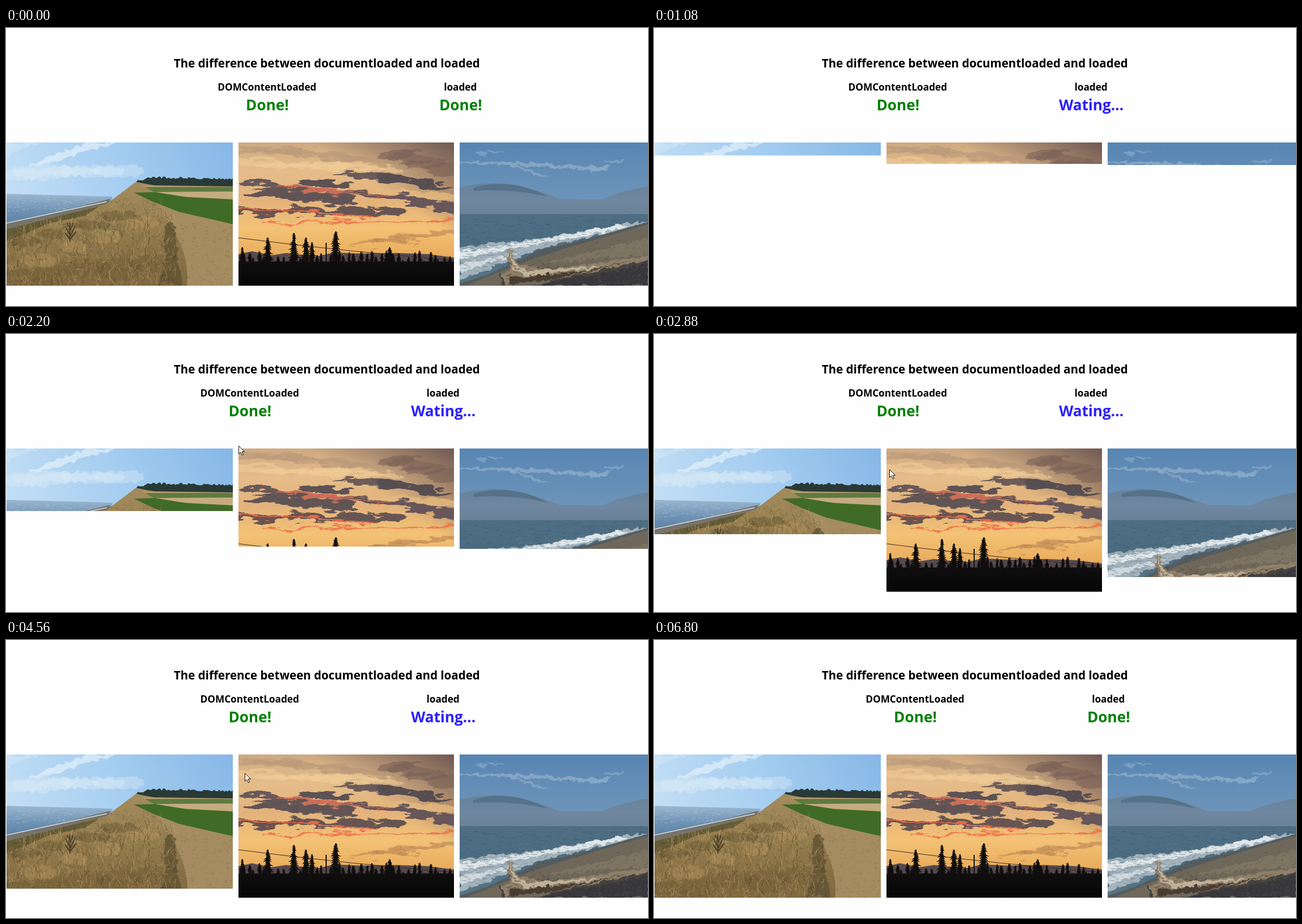
Recreate the animation shown at these times as an HTML page. Size 1135 px wide and 493 px high, loop 6.95 s.

```html
<!DOCTYPE html>
<html lang="en">
<head>
<meta charset="utf-8">
<title>Load events</title>
<style>
html, body { margin: 0; width: 100%; height: 100%; overflow: hidden; background: #fefefe; }
svg { display: block; width: 1135px; height: 493px; }
text { font-family: "Open Sans", "Noto Sans", sans-serif; font-weight: 700; text-anchor: middle; }
.head { font-size: 17.2px; }
.state { font-size: 26.2px; fill: #008000; }
</style>
</head>
<body>
<svg id="stage" viewBox="0 0 1135 493" xmlns="http://www.w3.org/2000/svg"></svg>
<script>
const TOP = 203, BOTTOM = 457;
const get = id => document.getElementById(id);

let seed = 11;
function rnd() {
  seed = (seed * 1664525 + 1013904223) >>> 0;
  return seed / 4294967296;
}
const between = (a, b) => a + (b - a) * rnd();
const mix = (a, b, u) => a + (b - a) * u;
const fix = n => n.toFixed(1);

const shape = (d, fill, o = 1) => `<path d="${d}" fill="${fill}" opacity="${o}"/>`;
const line = (d, color, w, o = 1) =>
  `<path d="${d}" fill="none" stroke="${color}" stroke-width="${w}" opacity="${o}"/>`;
const box = (x, y, w, fill) => `<rect x="${x}" y="${y}" width="${w}" height="${BOTTOM - y}" fill="${fill}"/>`;
const fray = (...parts) => `<g filter="url(#fray)">${parts.join('')}</g>`;

// Evenly spaced colour stops
function gradient(id, colors, dir = 'x1="0" y1="0" x2="0" y2="1"') {
  const stops = colors.map((c, i) => `<stop offset="${i / (colors.length - 1)}" stop-color="${c}"/>`);
  return `<linearGradient id="${id}" ${dir}>${stops.join('')}</linearGradient>`;
}

function rough(id, freq, scale) {
  return `<filter id="${id}" x="-10%" y="-10%" width="120%" height="120%" color-interpolation-filters="sRGB">
    <feTurbulence type="fractalNoise" baseFrequency="${freq}" numOctaves="4" seed="4"/>
    <feDisplacementMap in="SourceGraphic" scale="${scale}" xChannelSelector="R" yChannelSelector="G"/></filter>`;
}

// Short strokes scattered over a rectangle
function scatter(n, x0, x1, y0, y1, dx, dy, color, o = 0.5) {
  let d = '';
  for (let i = 0; i < n; i++) {
    const sx = between(-dx, dx), sy = between(-dy, 0);
    d += `M${fix(between(x0, x1))} ${fix(between(y0, y1))}q${fix(sx * 0.2)} ${fix(sy * 0.6)} ${fix(sx)} ${fix(sy)}`;
  }
  return line(d, color, 1, o);
}

// Flat ovals strung along a line
function band(n, x0, y0, x1, y1, rx, ry, color, o = 1) {
  let out = '';
  for (let i = 0; i < n; i++) {
    const u = n > 1 ? i / (n - 1) : 0;
    out += `<ellipse cx="${fix(mix(x0, x1, u))}" cy="${fix(mix(y0, y1, u) + between(-ry, ry) * 0.4)}"
      rx="${fix(rx * between(0.8, 1.2))}" ry="${fix(ry * between(0.7, 1.2))}" fill="${color}" opacity="${o}"/>`;
  }
  return out;
}

function conifer(x, top, base) {
  const rows = Math.ceil((base - top) / 4);
  const half = 3 + (base - top) * 0.15;
  let right = '', left = '';
  for (let i = 1; i <= rows; i++) {
    const y = mix(top, base, i / rows), w = half * Math.sqrt(i / rows);
    const a = w * between(0.5, 1.3), b = w * between(0.5, 1.3);
    right += `L${fix(x + a)} ${fix(y)}L${fix(x + a * 0.4)} ${fix(y - 1)}`;
    left = `L${fix(x - b * 0.4)} ${fix(y - 1)}L${fix(x - b)} ${fix(y)}` + left;
  }
  return `M${fix(x)} ${fix(top)}${right}${left}Z`;
}

function treeTops(x0, x1) {
  let d = `M${x0} 273`;
  for (let x = x0; x <= x1; x += 3) d += `L${x} ${fix(Math.max(264 + (x - x0) * 0.02, 272 - (x - x0) * 0.3) + between(-2, 2))}`;
  return d + `L${x1} 281L262 279Z`;
}

const hill = 'M1 357L120 327L178 312L228 274L246 269L270 276L401 281V457H1Z';

function grass() {
  const tones = ['#c0a26a', '#54462a', '#a98b55', '#66562f', '#d0b47c', '#463b24'];
  return tones.map(c => scatter(170, 1, 300, 335, 465, 9, 17, c) + scatter(30, 130, 275, 305, 345, 6, 9, c, 0.4)).join('');
}

const meadow = () => box(1, TOP, 400, 'url(#sky1)') +
  fray(
    shape('M40 247Q95 216 150 203H200Q130 221 62 244Z', '#e3eff9', 0.7),
    shape('M1 226Q35 207 75 204H1Z', '#d3e8f8', 0.5),
    band(5, 20, 262, 200, 255, 50, 12, '#dcebf6', 0.4)
  ) +
  shape('M1 294L188 299V320L1 352Z', 'url(#sea1)') +
  scatter(130, 2, 165, 298, 325, 6, 0.6, '#b4cbdf') +
  shape('M1 346Q90 327 184 303V318L1 360Z', '#77736a') +
  line('M1 346Q90 327 178 308', '#d5dee2', 1.4) +
  shape(hill, 'url(#grass)') +
  shape('M1 357L120 327L165 316L140 333L80 345L1 378Z', '#5b5433', 0.8) +
  shape('M240 279L401 281V303L265 292Z', '#b39c70') +
  shape('M246 282H401V290L262 291Z', '#5f7a3e') +
  shape('M262 291L401 290V304L300 298Z', '#c4ac80') +
  shape('M226 292L264 291L320 300L401 304V348L305 326L262 309Z', '#3f6b27') +
  shape(treeTops(230, 401), '#293a35') +
  `<g clip-path="url(#hillClip)">` +
  shape('M262 309L305 326L401 348V457H320Q326 400 285 340Z', '#a48c60') +
  fray(
    shape('M282 345Q300 340 300 362Q300 390 312 457H268Q288 410 280 385Z', '#5d5032', 0.75),
    band(4, 30, 380, 200, 335, 40, 9, '#6b5d38', 0.5),
    band(5, 20, 440, 260, 420, 40, 16, '#75603a', 0.5),
    band(4, 60, 415, 240, 345, 30, 11, '#b4965f', 0.45)
  ) +
  grass() + scatter(220, 300, 400, 345, 457, 5, 2, '#7a6644') + '</g>' +
  line('M113 379V344M105 352L114 368L123 350M104 363L113 375L124 361M108 346L114 357L119 346', '#3b3421', 1.4);

// A few tall firs stand out of a low, uneven wood
function wood() {
  let d = [[418, 388], [463, 371], [509, 363], [530, 371], [541, 379], [583, 360], [678, 388]]
    .map(([x, y]) => conifer(x, y, 420)).join('');
  for (let x = 414; x < 792; x += 8) d += conifer(x + between(-3, 3), between(394, 415), 420);
  return d;
}

const sunset = () => box(411, TOP, 381, 'url(#sky2)') +
  box(411, TOP, 381, 'url(#dusk)') +
  `<g filter="url(#torn)">` +
  band(6, 440, 215, 640, 235, 45, 6, '#b9987b', 0.6) +
  band(6, 440, 240, 660, 250, 45, 7, '#f0cb96', 0.6) +
  band(4, 690, 225, 770, 250, 40, 9, '#7b6158', 0.6) +
  band(5, 640, 290, 780, 300, 45, 7, '#e3b77d', 0.6) +
  band(8, 480, 280, 680, 300, 30, 4, '#c4705a') +
  band(3, 432, 273, 490, 281, 20, 4, '#66595a') +
  band(3, 545, 274, 600, 277, 24, 6, '#5d5254') +
  band(3, 600, 259, 655, 265, 22, 4, '#6b5c5a') +
  band(4, 680, 268, 765, 280, 24, 6, '#574e52') +
  band(6, 455, 293, 590, 304, 26, 8, '#615455') +
  band(4, 610, 290, 670, 299, 22, 4, '#6a5453') +
  band(8, 418, 326, 680, 326, 28, 7, '#665553') +
  band(4, 700, 302, 785, 320, 28, 8, '#67565a') +
  band(10, 430, 322, 640, 334, 22, 1.8, '#e8694a') +
  band(9, 480, 345, 760, 343, 26, 2, '#ee7a4e') +
  band(6, 500, 281, 670, 297, 20, 1.5, '#dd6a52') +
  band(5, 640, 380, 780, 362, 36, 5, '#b98455', 0.6) +
  '</g>' +
  shape('M411 401L435 396L470 403L495 399L550 405L580 398L625 400L690 399L745 401L792 407V425H411Z', '#55494d') +
  line('M411 372Q550 390 680 402T792 411', '#3b2a25', 1) +
  line('M583 362V418M566 381V418', '#15110f', 2) +
  shape(wood(), '#100e0d') +
  box(411, 414, 381, 'url(#ground)');

const shore = () => box(802, TOP, 333, 'url(#sky3)') +
  fray(
    shape('M802 238Q870 236 930 239L1050 247L1072 243L1060 253L900 244L802 242Z', '#94b1ca', 0.7),
    shape('M890 241Q930 250 960 266L948 266Q920 252 885 244Z', '#8dabc4', 0.7),
    band(2, 840, 223, 865, 218, 14, 2.5, '#86a9c7', 0.7),
    band(2, 1045, 252, 1075, 238, 16, 3, '#8dafcb', 0.6)
  ) +
  shape('M802 283Q860 268 915 282Q950 291 978 303L1055 304Q1080 290 1135 281V335H802Z', 'url(#mist)') +
  shape('M826 284Q862 271 908 280Q940 288 958 299Q890 284 826 289Z', '#526f86', 0.8) +
  box(802, 330, 333, 'url(#sea3)') +
  scatter(220, 804, 1125, 332, 388, 10, 0.7, '#38566b') +
  fray(
    shape('M802 390Q850 381 900 379Q960 370 1010 362L1135 341L1090 358L950 390L840 432L802 447Z', '#a3b2bb'),
    shape('M802 396L930 377L1085 349L1100 353L940 384L802 409Z', '#dfe6e9'),
    shape('M802 420L910 397L880 409L802 434Z', '#d0d9de')
  ) +
  scatter(220, 804, 920, 384, 432, 10, 2, '#667f8e') +
  scatter(120, 900, 1060, 362, 388, 8, 2, '#718896') +
  shape('M1135 344L1010 379L945 394L850 438L802 453V457H1135Z', '#565c5d') +
  shape('M1135 348L985 392L925 412L812 457H1135Z', '#6f685a') +
  fray(
    shape('M1135 372L1000 405L950 418L1135 402Z', '#7d7462'),
    shape('M985 442L1135 410V457H935Z', '#38383c'),
    shape('M870 437L930 430L1135 405V418L1030 440L880 455Z', '#45413c')
  ) +
  scatter(260, 930, 1134, 415, 457, 3, 1.4, '#6d6a66') +
  scatter(260, 930, 1134, 375, 425, 4, 1, '#4d493f') +
  fray(
    shape('M879 402L887 405L890 394L905 418L950 429L1135 403V412L980 443L884 454L874 437L895 428L888 414Z', '#8d7f68'),
    shape('M890 397L900 417L922 432L1070 420L930 441L898 430Z', '#c0b299'),
    shape('M892 442L1000 434L1110 413L965 445L890 454Z', '#493c30')
  ) +
  scatter(60, 885, 960, 415, 452, 8, 4, '#4b3e31', 0.7);

const photos = [
  { x: 1, w: 400, draw: meadow },
  { x: 411, w: 381, draw: sunset },
  { x: 802, w: 333, draw: shore }
];

get('stage').innerHTML = `<defs>
  ${gradient('sky1', ['#c3dff5', '#a4cdf0', '#86b7e6'], 'x1="0" y1=".35" x2="1" y2="0"')}
  ${gradient('sea1', ['#9ab7cf', '#7093b5', '#587d9e'])}
  ${gradient('grass', ['#a58d5f', '#917a4c', '#806840'])}
  ${gradient('sky2', ['#cda981', '#e5bd8a', '#e3b27c', '#f3c275', '#e9ab5c', '#cf8c50'])}
  ${gradient('dusk', ['#6b555000', '#6b555000', '#6b555000', '#6b5550f0'], 'x1="0" y1="1" x2="1" y2="0"')}
  ${gradient('ground', ['#100e0e', '#060606'])}
  ${gradient('sky3', ['#5785b2', '#7399bc', '#7b9ab5'])}
  ${gradient('mist', ['#67829b', '#6f879f', '#6a8296'])}
  ${gradient('sea3', ['#4f6e84', '#4a6b80', '#5a7584'])}
  ${rough('fray', '0.08', 12)}
  ${rough('torn', '0.025 0.09', 24)}
  <clipPath id="hillClip"><path d="${hill}"/></clipPath>
  ${photos.map((p, i) => `<clipPath id="clip${i}"><rect id="rows${i}" x="${p.x}" y="${TOP}" width="${p.w}"/></clipPath>`).join('')}
</defs>
<text x="567.3" y="69.5" font-size="20.57">The difference between documentloaded and loaded</text>
<g id="labels">
  <text class="head" x="461.5" y="111.3">DOMContentLoaded</text>
  <text class="head" x="803.3" y="111.3">loaded</text>
  <text class="state" x="462" y="146.3">Done!</text>
  <text class="state" id="state" x="803.8" y="146.3"></text>
</g>
${photos.map((p, i) => `<g id="photo${i}"><g clip-path="url(#clip${i})">${p.draw()}</g></g>`).join('')}
<path id="cursor" d="M.5 .5V14.5L3.8 11.4L6.3 17L8.5 16L6.1 10.6H10.5Z" fill="#fff" stroke="#111"/>`;

const labels = get('labels'), state = get('state'), cursor = get('cursor'), middle = get('photo1');
const rows = photos.map((p, i) => get('rows' + i));

// The screen refreshes in steps of 140 ms after the reload
const LOOP = 6950, CLEAR = 500, FIRST = 770, STEP = 140;
const ALL_IN = 29, ENTER = 8, LEAVE = 43;

// [step, lower edge of the loaded part]
const progress = [
  [[0, 203], [6, 272], [11, 325], [15, 355], [23, 408], [ALL_IN, 457]],
  [[0, 215], [1, 223], [6, 315], [11, 392], [13, 457]],
  [[0, 203], [6, 324], [11, 395], [15, 431], [18, 457]]
];

// [step, x, y]
const route = [[ENTER, 393, 28], [9, 405, 155], [11, 416, 240], [17, 416, 240], [19, 427, 241], [21, 419, 235],
  [28, 423, 236], [30, 583, 279], [32, 718, 323], [38, 773, 348], [41, 1031, 474], [LEAVE, 1052, 500]];

function at(keys, k, col = 1) {
  const i = keys.findIndex(key => key[0] >= k);
  if (i < 0) return keys[keys.length - 1][col];
  if (i === 0) return keys[0][col];
  const a = keys[i - 1], b = keys[i];
  return Math.round(mix(a[col], b[col], (k - a[0]) / (b[0] - a[0])));
}

function render(ms) {
  const t = ms % LOOP;
  // Refreshes drift a little around the even beat
  const k = Math.floor((t - FIRST + (t > FIRST + STEP ? 10 : 0)) / STEP);
  const done = t < CLEAR || k >= ALL_IN;

  labels.setAttribute('transform', `translate(${done ? 0 : -30.7} 0)`);
  state.textContent = done ? 'Done!' : 'Wating...';
  state.style.fill = done ? '#008000' : '#2a1fff';

  rows.forEach((r, i) => {
    const edge = done ? BOTTOM : k < 0 ? TOP : at(progress[i], k);
    r.setAttribute('height', edge - TOP);
  });
  // Alone in its row, the middle photo is centred
  middle.setAttribute('transform', `translate(${k === 0 ? -34 : 0} 0)`);

  cursor.style.display = k >= ENTER && k < LEAVE ? '' : 'none';
  cursor.setAttribute('transform', `translate(${at(route, k)} ${at(route, k, 2)})`);
}

const start = performance.now();
(function loop() {
  render(performance.now() - start);
  requestAnimationFrame(loop);
})();
</script>
</body>
</html>
```
